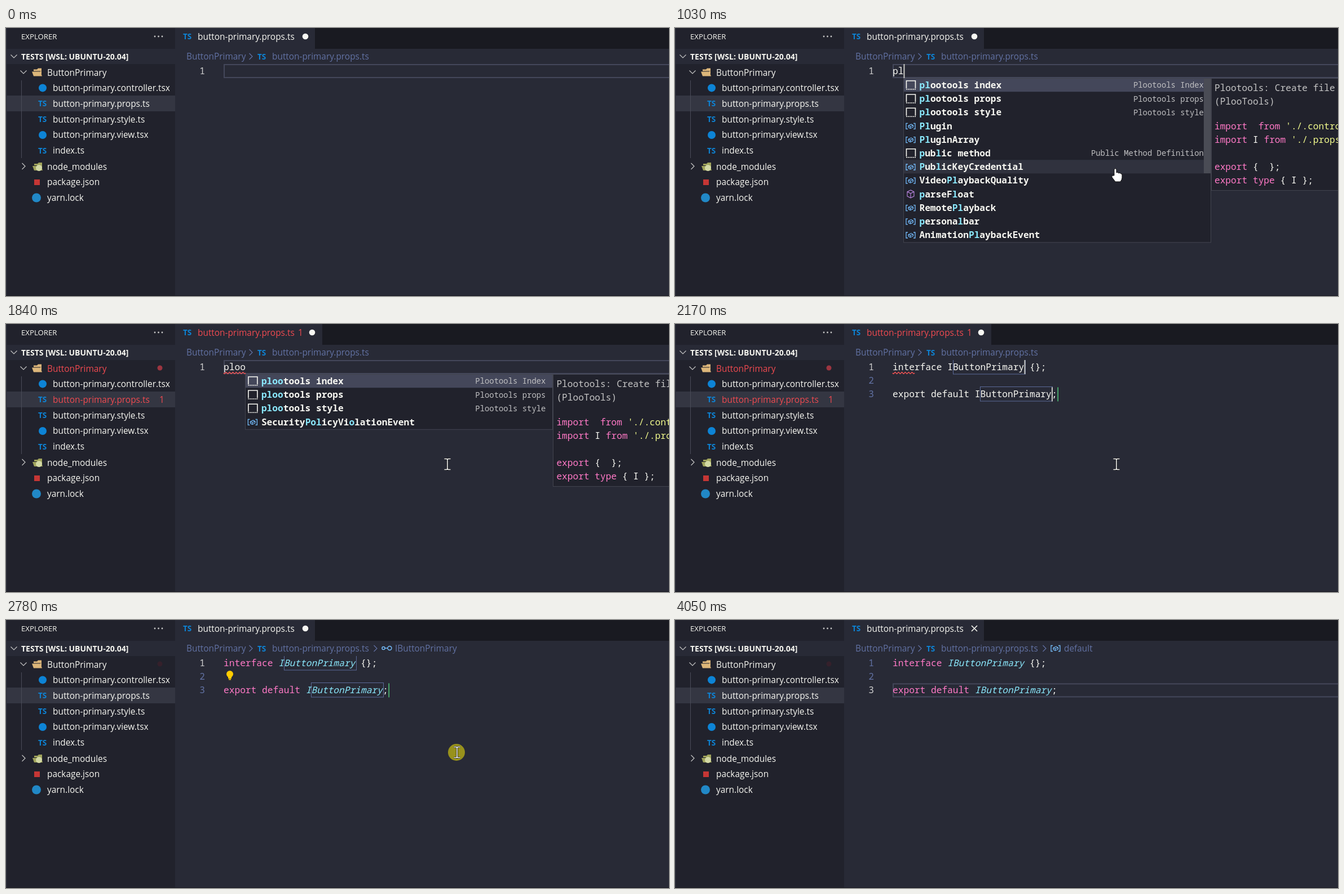
An HTML page with a canvas for the animation above (4140 ms loop, 1176 by 476 pixels).

```html
<!DOCTYPE html>
<html lang="en">
<head>
<meta charset="utf-8">
<title>Snippet completion</title>
<style>
  html, body { margin: 0; width: 100%; height: 100%; overflow: hidden; background: #282a36; }
  canvas { display: block; }
</style>
</head>
<body>
<canvas id="stage" width="1176" height="476"></canvas>
<script>
const ctx = document.getElementById('stage').getContext('2d');
const LOOP = 4140, LEFT = 386, CELL = 9.72, LINE = 24.2;
const C = {
  bg: '#282a36', side: '#21222c', dark: '#191a21', line: '#44475a', white: '#f8f8f2', muted: '#6272a4',
  pink: '#ff79c6', cyan: '#8be9fd', yellow: '#f1fa8c', red: '#f04a50', blue: '#0d84d6', symbol: '#75beff',
  grey: '#c5c5c5', green: '#50c878'
};
const UI = '500 15.4px "Open Sans", sans-serif';
const BADGE = 'bold 13.5px "Open Sans", sans-serif';
const mono = (style = '500', size = 16.2) => `${style} ${size}px "Noto Sans Mono", monospace`;

// ---------- drawing helpers ----------
function rect(x, y, w, h, color) {
  ctx.fillStyle = color;
  ctx.fillRect(x, y, w, h);
}
function frame(x, y, w, h, color, width = 1) {
  ctx.strokeStyle = color;
  ctx.lineWidth = width;
  ctx.strokeRect(x, y, w, h);
}
function disc(x, y, r, color) {
  ctx.fillStyle = color;
  ctx.beginPath();
  ctx.arc(x, y, r, 0, 7);
  ctx.fill();
}
function text(str, x, y, color, font = UI, align = 'left') {
  ctx.font = font;
  ctx.fillStyle = color;
  ctx.textAlign = align;
  ctx.fillText(str, x, y);
}
function path(d, x, y, color, width = 1.2) {
  ctx.save();
  ctx.translate(x, y);
  const shape = new Path2D(d);
  if (width) {
    ctx.strokeStyle = color;
    ctx.lineWidth = width;
    ctx.stroke(shape);
  } else {
    ctx.fillStyle = color;
    ctx.fill(shape);
  }
  ctx.restore();
}
// Runs are [text, color, style] and sit on the character grid.
function spans(x, y, runs) {
  for (const [str, color = C.white, style] of runs) {
    text(str, x, y, color, mono(style));
    x += str.length * CELL;
  }
}

// ---------- icons ----------
const CUBE = 'M0-7L6-4V4L0 7L-6 4V-4ZM-6-4L0-1L6-4M0-1V7';
const chevronDown = (x, y) => path('M-5.5-2.5L0 3L5.5-2.5', x, y, C.grey);
const chevronRight = (x, y, color) => path('M-2.5-5.5L3 0L-2.5 5.5', x, y, color);
const ts = (x, y) => text('TS', x, y, C.blue, BADGE);

function folder(x, y, color) {
  path('M-6-2V-5H0L2-7H8V-2Z', x, y, color, 0);
  path('M-9-1H6L9 7H-6Z', x, y, color, 0);
  path('M7-2V3', x, y, color, 2);
}
function fieldIcon(x, y) {
  path('M-5-5H-8V5H-5M5-5H8V5H5', x, y, C.symbol, 1.3);
  path('M-4-1L1-3.5L4.5-1.5V1.5L-.5 4L-4 2ZM-4-1L-.5 .5L4.5-1.5M-.5 .5V4', x, y, C.symbol, 1.1);
}
function snippetIcon(x, y) {
  path('M-7.5 6V-7.5H8.5V6', x, y, C.white, 1.6);
  ctx.setLineDash([2, 1]);
  path('M-8 7.5H9', x, y, C.white, 1.6);
  ctx.setLineDash([]);
}
function interfaceIcon(x, y) {
  path('M-3 0H2', x, y, C.symbol, 1.4);
  path('M-3 0A2.5 2.5 0 1 1-8 0A2.5 2.5 0 1 1-3 0M9 0A3.5 3.5 0 1 1 2 0A3.5 3.5 0 1 1 9 0', x, y, C.symbol, 1.4);
}
function bulb(x, y) {
  disc(x, y - 2, 6, '#ffcc00');
  rect(x - 3, y + 2, 6, 4, '#ffcc00');
  rect(x - 2, y + 6.5, 4, 2, '#ffcc00');
}
function ibeam(x, y) {
  const d = 'M-5.5-9.5H-2Q0-9.5 0-8Q0-9.5 2-9.5H5.5M0-8V8M-5.5 9.5H-2Q0 9.5 0 8Q0 9.5 2 9.5H5.5';
  path(d, x, y, '#111', 3);
  path(d, x, y, '#fff', 1.5);
}
function hand(x, y) {
  const d = 'M-4 2V-9Q-2-12 0-9V-3Q2-5 4-2Q6-4 8-1Q10-2 10 1V6Q10 9 7 13H-2L-8 5Q-9 2-6 2Z';
  path(d, x, y, '#fff', 0);
  path(d, x, y, '#111', 1);
}

// ---------- timeline ----------
const between = (t, from, to) => t >= from && t < to;
const lerp = (a, b, k) => a + (b - a) * k;

function typed(t) {
  const times = [820, 890, 1230, 1300];
  return 'ploo'.slice(0, times.filter(at => t >= at).length);
}
function travel(t, start, end, steps, from, to) {
  const raw = Math.max(0, Math.min(1, (t - start) / (end - start)));
  const k = Math.floor(raw * steps + 0.001) / steps;
  const eased = k * k * (3 - 2 * k);
  return [lerp(from[0], to[0], eased), lerp(from[1], to[1], eased)];
}
const REST = [783, 249], CLICK = [800, 235];
function pointer(t) {
  if (t < 2450) return travel(t, 70, 370, 4, [958, 377], REST);
  if (t < 3130) return travel(t, 2450, 2650, 3, REST, CLICK);
  return travel(t, 3060, 3520, 6, CLICK, [957, 463]);
}

// ---------- panels ----------
function sidebar(t) {
  const error = between(t, 1840, 2510);
  const mark = error ? C.red : C.white;
  rect(0, 0, 300, 476, C.side);
  rect(0, 37, 300, 27, C.bg);
  rect(0, 120, 300, 28, '#343642');
  rect(0, 0, 1.5, 476, '#2d2f3b');
  text('EXPLORER', 27, 20, C.white, '13.2px "Open Sans", sans-serif');
  for (const x of [264, 270.5, 277]) disc(x, 15, 1.4, C.grey);
  chevronDown(14, 50);
  text('TESTS [WSL: UBUNTU-20.04]', 27, 56, C.white, 'bold 14px "Open Sans", sans-serif');
  rect(27, 93, 1, 138, '#494b58');

  chevronDown(31, 78);
  folder(55, 78.5, '#dcb67a');
  text('ButtonPrimary', 73, 84.5, mark);
  if (error) disc(273, 78, 4.5, '#9c3540');
  else if (t >= 2510) disc(273, 78, 4.5, '#35202b');

  const files = ['controller.tsx', 'props.ts', 'style.ts', 'view.tsx'].map(s => 'button-primary.' + s).concat('index.ts');
  files.forEach((name, i) => {
    const y = 106.4 + i * 27.85;
    if (name.endsWith('x')) disc(65, y, 7, C.blue);
    else ts(57, y + 5);
    text(name, 83, y + 5.5, i === 1 ? mark : C.white);
  });
  if (error) text('1', 272, 140, C.red);

  chevronRight(31, 245.5, C.grey);
  folder(56, 246, '#a0a45c');
  disc(58.5, 248.5, 5.5, '#d3d9a4');
  text('node_modules', 73, 251.5, C.white);
  rect(50, 269, 10, 10, '#c53635');
  text('package.json', 73, 279, C.white);
  disc(54, 301.5, 8, '#2188c6');
  text('yarn.lock', 73, 307, C.white);
}

function header(t) {
  const error = between(t, 1770, 2510);
  rect(300, 0, 876, 37, C.dark);
  rect(300, 0, error ? 261 : 248, 37, C.bg);
  rect(300, 37, 876, 27, C.bg);
  ts(314, 20);
  text('button-primary.props.ts', 340, 20.5, error ? C.red : C.white);
  if (error) text('1', 518, 20.5, C.red);
  if (t >= 3440) path('M-5-5L5 5M5-5L-5 5', 531, 15, C.white, 1.6);
  else disc(error ? 543 : 531, 15, 5.3, C.white);

  text('ButtonPrimary', 320, 56, C.muted);
  chevronRight(434, 50.5, C.muted);
  ts(446, 56);
  text('button-primary.props.ts', 472, 56, C.muted);
  if (t < 2580) return;
  chevronRight(655, 50.5, C.muted);
  if (t < 2980) interfaceIcon(675, 50);
  else fieldIcon(675, 50.5);
  text(t < 2980 ? 'IButtonPrimary' : 'default', 690, 56, C.muted);
}

const lineTop = n => 64 + (n - 1) * LINE;
const caret = (x, n, color = '#c8c8c4') => rect(x, lineTop(n), 2, 25, color);

function squiggle() {
  ctx.strokeStyle = '#ff5555';
  ctx.lineWidth = 1.3;
  ctx.beginPath();
  for (let x = LEFT; x <= 425; x++) ctx.lineTo(x, 87 + 1.5 * Math.sin((x - LEFT) * 1.05));
  ctx.stroke();
}

function editor(t) {
  rect(300, 37, 876, 439, C.bg);
  const expanded = t >= 2170, clicked = t >= 2980;
  const active = clicked ? 3 : 1;
  if (clicked || !expanded) frame(LEFT + 1, lineTop(active) + 1, 900, 23, C.line, 2);
  for (let n = 1; n <= (expanded ? 3 : 1); n++) {
    text(n, 353, lineTop(n) + 18, n === active ? '#d0d0d0' : C.muted, mono(), 'right');
  }

  if (expanded) {
    const colored = t >= 2310;
    const keyword = colored ? C.pink : C.white;
    const type = colored ? [C.cyan, 'italic 500'] : [C.white];
    if (!clicked) {
      frame(493.5, 63.5, 128, 25.5, '#5b6a99');
      frame(541.5, lineTop(3) - 0.9, 128, 25.5, '#5b6a99');
      rect(678.5, lineTop(3), 1.5, 25, C.green);
    }
    spans(LEFT, 82, [['interface ', keyword], ['IButtonPrimary', ...type], [' {};']]);
    spans(LEFT, 130.4, [['export default ', keyword], ['IButtonPrimary', ...type], [';']]);
    if (t < 2650) {
      caret(619.5, 1);
      caret(668, 3);
    }
    if (between(t, 2980, 3280) || between(t, 3780, 4050)) caret(678, 3);
    if (between(t, 2450, 3130)) bulb(397, 98);
  } else {
    const word = typed(t);
    spans(LEFT, 82, [[word]]);
    if (between(t, 70, 1840)) caret(LEFT + word.length * CELL, 1);
  }
  if (between(t, 1630, 2310)) squiggle();
}

// ---------- completion popup ----------
// Matched letters stand in [brackets].
const TOOLS = ['index', 'props', 'style'];
const BROAD = [
  ...TOOLS.map(s => '[pl]ootools ' + s), '[Pl]ugin', '[Pl]uginArray', '[p]ub[l]ic method',
  '[P]ub[l]icKeyCredential', 'Video[Pl]aybackQuality', '[p]arseF[l]oat', 'Remote[Pl]ayback',
  '[p]ersona[l]bar', 'Animation[Pl]aybackEvent'
];
const narrow = word => [...TOOLS.map(s => `[${word}]${'plootools'.slice(word.length)} ${s}`), 'Security[Pol]icyVi[o]lationEvent'];
const NOTES = ['Plootools Index', 'Plootools props', 'Plootools style'];

function popup(t) {
  const word = typed(t), broad = word.length < 3;
  const x = LEFT - 0.5 + word.length * CELL;
  const rows = broad ? BROAD : narrow(word);
  const height = rows.length * LINE + 1;
  rect(x, 89, 546, height, C.side);
  rect(x, 89, 546, LINE, C.line);
  if (broad && t >= 1030) rect(x, 89 + 6 * LINE, 546, LINE, '#30323e');
  if (broad) rect(x + 533, 90, 13, 168, '#4a4c55');
  frame(Math.round(x) + 0.5, 89.5, 545, height, '#42444f');

  rows.forEach((label, i) => {
    const y = 101.3 + i * LINE;
    const snippet = i < 3 || label.endsWith('method');
    if (snippet) snippetIcon(x + 13, y);
    else if (label.endsWith('oat')) path(CUBE, x + 13, y, '#b180d7');
    else fieldIcon(x + 13, y + 0.5);
    const runs = label.split(/[\[\]]/).map((s, k) => [s, k % 2 ? C.cyan : C.white, k % 2 ? 'bold' : '600']);
    spans(x + 28.5, y + 5.6, runs);
    const note = i < 3 ? NOTES[i] : snippet ? 'Public Method Definition' : '';
    text(note, x + 533, y + 5, '#c0c0c2', mono('400', 13.9), 'right');
  });
  if (t >= 1030) docs(x + 546);
}

function docs(x) {
  rect(x, 89, 400, 199, C.side);
  frame(Math.round(x) + 0.5, 89.5, 400, 199, '#42444f');
  const lines = [
    [112, [['Plootools: Create file', C.grey]]],
    [136, [['(PlooTools)', C.grey]]],
    [180, [['import  from ', C.pink], ["'./.controller'", C.yellow], [';']]],
    [204, [['import ', C.pink], ['I '], ['from ', C.pink], ["'./.props'", C.yellow], [';']]],
    [252, [['export ', C.pink], ['{  };']]],
    [276, [['export type ', C.pink], ['{ I };']]]
  ];
  for (const [y, runs] of lines) spans(x + 6, y, runs);
}

function draw() {
  const t = performance.now() % LOOP;
  editor(t);
  sidebar(t);
  header(t);
  if (between(t, 960, 1900)) popup(t);
  rect(0, 475, 1176, 1, C.dark);
  if (between(t, 70, 3520)) {
    const [x, y] = pointer(t);
    if (between(t, 2720, 2980)) disc(x - 1, y, 15, 'rgba(190,180,20,.75)');
    if (between(t, 1030, 1230)) hand(x, y + 11);
    else ibeam(x, y);
  }
  requestAnimationFrame(draw);
}
draw();
</script>
</body>
</html>
```
